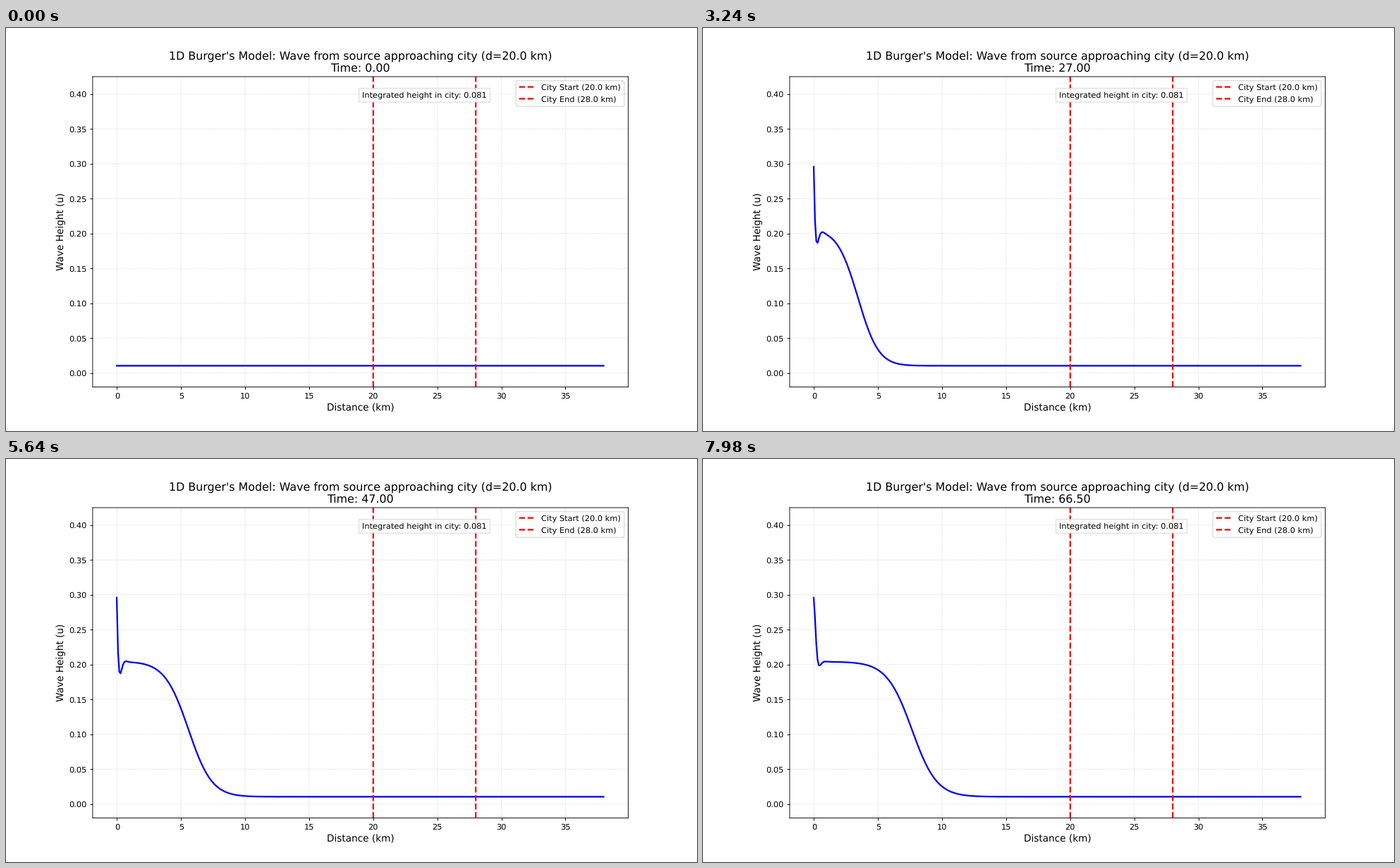
A matplotlib script that plays this animation: 980 by 572 pixels, repeating every 8 s.

```python
import numpy as np
import matplotlib.pyplot as plt
from matplotlib.animation import FuncAnimation
from matplotlib.transforms import ScaledTranslation

DPI = 245 / 3
WIDTH, HEIGHT = 980, 572
INTERVAL = 20           # ms per drawn frame
HOLD = 3                # drawn frames per simulation snapshot
FRAMES = 400

CITY_START, CITY_END = 20.0, 28.0
LENGTH, DX = 38.0, 0.1
VISCOSITY, BASE = 0.095, 0.01
STEP, SUBSTEPS = 0.5, 50
SNAPSHOTS = (FRAMES - 1) // HOLD + 1
NUDGE = 0.005           # inches the frame sits right of and below the data

plt.rcParams.update({"path.snap": False, "text.hinting": "no_hinting"})


def inflow(t):
    """Oscillating wave height at the left end."""
    return 0.2022 + 0.1153 * np.sin(2 * np.pi * 1.6 * t - np.pi / 10)


def simulate(x):
    """Viscous Burgers equation, explicit in time, upwind advection."""
    u = np.full(x.size, BASE)
    history = [u.copy()]
    dt = STEP / SUBSTEPS
    for n in range(1, (SNAPSHOTS - 1) * SUBSTEPS + 1):
        left, mid, right = u[:-2], u[1:-1], u[2:]
        advect = mid * (mid - left) / DX
        diffuse = VISCOSITY * (right - 2 * mid + left) / DX**2
        u[1:-1] = mid + dt * (diffuse - advect)
        u[0] = inflow(n * dt)
        u[-1] = u[-2]
        if n % SUBSTEPS == 0:
            history.append(u.copy())
    return history


x = np.linspace(0, LENGTH, round(LENGTH / DX) + 1)
waves = simulate(x)
in_city = (x > CITY_START - DX / 2) & (x < CITY_END + DX / 2)

# The tiny margin keeps the canvas from rounding down a pixel.
fig, ax = plt.subplots(
    figsize=((WIDTH + 1e-6) / DPI, (HEIGHT + 1e-6) / DPI), dpi=DPI)
dx, dy = NUDGE * DPI / WIDTH, NUDGE * DPI / HEIGHT
fig.subplots_adjust(left=0.125 + dx, right=0.9 + dx,
                    bottom=0.11 - dy, top=0.88 - dy)

ax.set_xlim(-0.05 * LENGTH, 1.05 * LENGTH)
ax.set_ylim(-0.02, 0.425)
shift = ScaledTranslation(-NUDGE, NUDGE, fig.dpi_scale_trans)
line, = ax.plot(x, waves[0], color="blue", lw=2,
                transform=ax.transData + shift)
for name, place in (("Start", CITY_START), ("End", CITY_END)):
    ax.axvline(place, color="red", ls="--", lw=2,
               label=f"City {name} ({place:.1f} km)")

ax.set_xlabel("Distance (km)", fontsize=12)
ax.set_ylabel("Wave Height (u)", fontsize=12)
ax.grid(True, ls=":", alpha=0.6)
ax.legend(loc="upper right", labelspacing=0.54)
title = ax.set_title("", fontsize=14)
label = ax.text((CITY_START + CITY_END) / 2, 0.95 * 0.425, "",
                ha="center", va="top", fontsize=10,
                bbox=dict(facecolor="white", edgecolor="lightgray", alpha=0.8))


def update(frame):
    k = frame // HOLD
    u = waves[k]
    line.set_ydata(u)
    title.set_text("1D Burger's Model: Wave from source approaching city "
                   f"(d={CITY_START:.1f} km)\nTime: {k * STEP:.2f}")
    label.set_text(f"Integrated height in city: {u[in_city].sum() * DX:.3f}")
    return line, title, label


anim = FuncAnimation(fig, update, frames=FRAMES, interval=INTERVAL,
                     repeat=True, repeat_delay=0, blit=False)
plt.show()
```
